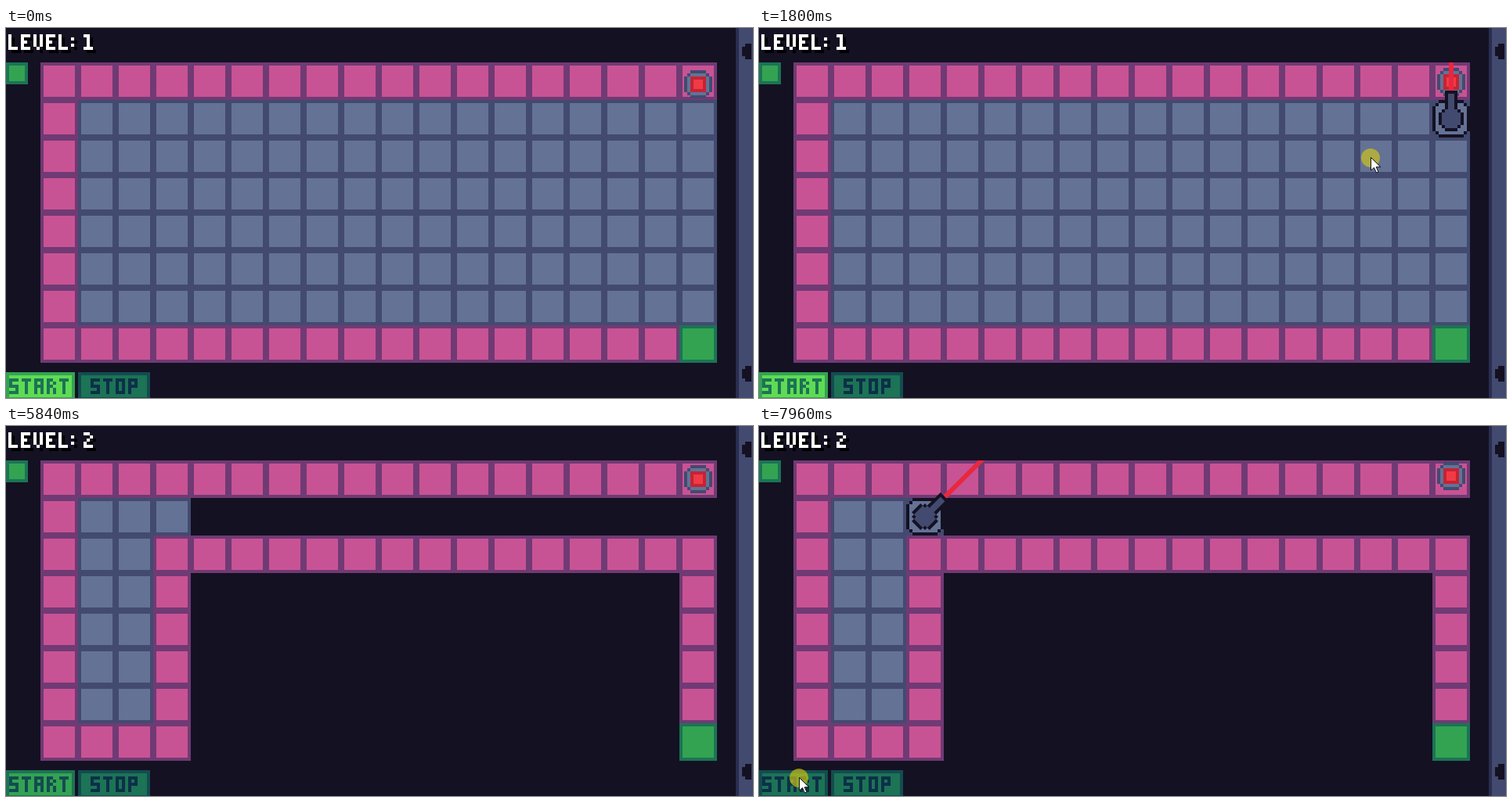
An HTML page with a canvas for the animation above (8 s loop, 954x473 px).

```html
<!DOCTYPE html>
<html lang="en">
<head>
<meta charset="utf-8">
<title>Tank puzzle</title>
<style>
html, body { margin: 0; width: 954px; height: 473px; overflow: hidden; background: #141122; }
canvas { display: block; }
</style>
</head>
<body>
<canvas id="stage" width="954" height="473" aria-label="Tank puzzle, level 1 and level 2, start and stop buttons"></canvas>
<script>
const ctx = document.getElementById('stage').getContext('2d');
const LOOP = 8000, STEP = 40, PX = 4, CELL = 48, COLS = 18, ROWS = 8, LEVEL2 = 5440;
const DARK = '#141122', STEEL = '#434a70', SLATE = '#647296';
const GREENS = ['#0c3048', '#134c50', '#1c7355', '#33a352', '#5fdb53'];
const TILES = {
  pink: ['#703a74', '#c85394'],
  slate: [STEEL, SLATE],
  green: [GREENS[2], GREENS[3]],
  red: ['#c42434', '#f23a46']
};

// Pixel letters as strokes on a 3 x 5 grid
const GLYPHS = {
  L: 'M0 0V4H2', E: 'M2 0H0V4H2M0 2H1', V: 'M0 0V3M2 0V3M1 4h.01',
  ':': 'M0 1h.01M0 3h.01', 1: 'M0 0H1V4M0 4H2',
  2: 'M0 0H1M2 1h.01M1 2h.01M0 3V4H2',
  S: 'M2 0H0V2H2V4H0', T: 'M0 0H2M1 0V4', A: 'M0 4V0H2V4M0 2H2',
  R: 'M0 4V0H1M2 1h.01M0 2H1M2 3V4', O: 'M0 0H2V4H0Z', P: 'M0 4V0H2V2H0'
};

// Pointer path: time, x, y
const PATH = [
  [160, 990, 130], [360, 910, 45], [480, 896, 30], [560, 896, 30],
  [1000, 798, 63], [1165, 880, 127], [1690, 880, 127], [2200, 51, 450],
  [2240, 51, 450], [2350, 51, 500], [2350, 990, 130], [6280, 990, 130],
  [6480, 908, 46], [6600, 898, 35], [6690, 898, 35], [7100, 212, 114],
  [7500, 212, 114], [7900, 51, 450]
];

function ease(t, from, to) {
  const u = Math.min(1, Math.max(0, (t - from) / (to - from)));
  return u * u * (3 - 2 * u);
}

function pointer(t) {
  const i = PATH.findIndex(k => k[0] > t);
  if (i === 0) return PATH[0].slice(1);
  if (i < 0) return PATH[PATH.length - 1].slice(1);
  const [t0, x0, y0] = PATH[i - 1], [t1, x1, y1] = PATH[i], s = ease(t, t0, t1);
  return [x0 + (x1 - x0) * s, y0 + (y1 - y0) * s];
}

function rect(color, x, y, w, h) {
  ctx.fillStyle = color;
  ctx.fillRect(x, y, w, h);
}

function box([edge, fill], x, y, w, h) {
  rect(edge, x, y, w, h);
  rect(fill, x + PX, y + PX, w - 2 * PX, h - 2 * PX);
}

// Centred square of n pixels with stepped corners
function block(color, x, y, n, cut) {
  const size = n * PX;
  for (let i = 0; i <= cut; i++) {
    const dx = (cut - i) * PX, dy = i * PX;
    rect(color, x - size / 2 + dx, y - size / 2 + dy, size - 2 * dx, size - 2 * dy);
  }
}

function text(str, x, y, color) {
  ctx.strokeStyle = color;
  ctx.lineWidth = 1;
  ctx.lineCap = 'square';
  for (const ch of str) {
    if (GLYPHS[ch]) {
      ctx.save();
      ctx.translate(x, y);
      ctx.scale(PX, PX);
      ctx.translate(.5, .5);
      ctx.stroke(new Path2D(GLYPHS[ch]));
      ctx.restore();
    }
    x += ch === ':' || ch === ' ' ? 8 : 16;
  }
}

function tileAt(level, c, r) {
  if (c === 17 && r === 7) return 'green';
  if (r === 0 || c === 0) return 'pink';
  if (level === 1) return r === 7 ? 'pink' : 'slate';
  if (r === 1) return c < 4 ? 'slate' : null;
  if (c < 3) return r === 7 ? 'pink' : 'slate';
  return c === 3 || r === 2 || (c === 17 && r < 7) ? 'pink' : null;
}

function drawMap(level) {
  for (let r = 0; r < ROWS; r++)
    for (let c = 0; c < COLS; c++) {
      const kind = tileAt(level, c, r);
      if (kind) box(TILES[kind], 44 + c * CELL, 44 + r * CELL, CELL, CELL);
    }
}

function drawTarget(y) {
  block(STEEL, 884, y, 9, 2);
  block(SLATE, 884, y, 7, 1);
  block(TILES.red[0], 884, y, 5, 0);
  block(TILES.red[1], 884, y, 3, 0);
}

function drawTank(x, y, angle = 0) {
  ctx.save();
  ctx.translate(x, y);
  block(DARK, 0, 0, 12, 2);
  block(SLATE, 0, 0, 10, 1);
  ctx.rotate(angle);
  block(DARK, 0, 0, 8, 2);
  rect(DARK, 0, -8, 36, 16);
  block(STEEL, 0, 0, 6, 1);
  rect(STEEL, 0, -4, 32, 8);
  ctx.restore();
}

function drawLaser(x, y, angle) {
  ctx.save();
  ctx.beginPath();
  ctx.rect(44, 44, COLS * CELL, ROWS * CELL);
  ctx.clip();
  ctx.translate(x, y);
  ctx.rotate(angle);
  rect('#e8283f', 36, -3, 1200, 6);
  ctx.restore();
}

// glow: 0 off, 1 half lit, 2 lit
function drawButton(label, x, w, textX, glow) {
  box([GREENS[glow + 1], GREENS[glow + 2]], x, 440, w, 36);
  text(label, textX, 448, GREENS[glow]);
}

function drawPanel(x, count) {
  rect(STEEL, x, 0, 120, 473);
  rect('#2a2d50', x, 0, PX, 473);
  for (const y of [20, 432]) {
    rect(DARK, x + 12, y, 8, 20);
    rect(DARK, x + 8, y + 4, 4, 12);
  }
  if (count) {
    drawTank(x + 52, 28);
    text(String(count), x + 92, 4, '#fff');
  }
}

function drawPointer(x, y) {
  ctx.fillStyle = 'rgba(212,200,20,.65)';
  ctx.beginPath();
  ctx.arc(x, y, 12, 0, 7);
  ctx.fill();
  ctx.save();
  ctx.translate(x + .5, y);
  const arrow = new Path2D('M0 0V16L4 12.5L7 19L9.5 18L6.7 11.7H12Z');
  ctx.fillStyle = '#fff';
  ctx.fill(arrow);
  ctx.strokeStyle = '#111';
  ctx.lineWidth = 1;
  ctx.stroke(arrow);
  ctx.restore();
}

const rise = (t, half, full) => t < half ? 0 : t < full ? 1 : 2;

function draw(t) {
  const level = t < LEVEL2 ? 1 : 2, first = level === 1;
  const [pick, drop, turn] = first ? [560, 1360, 1480] : [6690, 7200, 7340];
  const angle = t < turn ? 0 : first ? -Math.PI / 2 : -Math.PI / 4;
  const home = first ? [884, 116] : [212, 116];

  rect(DARK, 0, 0, 954, 473);
  text(`LEVEL: ${level}`, 7, 12, '#000');
  text(`LEVEL: ${level}`, 3, 8, '#fff');
  box(TILES.green, 0, 44, 28, 28);
  drawMap(level);

  const running = first && t >= 2280;
  if (!running) {
    const bob = first ? Math.cos((t - 60) / 125) : -Math.sin((t - LEVEL2) / 125);
    drawTarget(68 + Math.round(4 * bob));
  }
  if (t >= 4800 && t < 4840) box(TILES.red, 864, 48, 40, 40);

  if (t >= drop) {
    if (t >= turn && !running) drawLaser(...home, angle);
    drawTank(...home, angle);
  }

  const start = first ? 2 - rise(t, 2200, 2240) : rise(t, 5800, 5880) - rise(t, 7920, 7960);
  const stop = first ? rise(t, 2320, 2360) : 2 - rise(t, 5600, 5680);
  drawButton('START', 0, 88, 4, start);
  drawButton('STOP', 92, 92, 108, stop);

  const open = first
    ? ease(t, 140, 440) - ease(t, 720, 960)
    : ease(t, 6260, 6540) - ease(t, 6800, 7060);
  drawPanel(Math.round(932 - 88 * open), first ? +(t < pick) : 2);

  // A carried tank trails the pointer slightly
  if (t >= pick && t < drop) drawTank(...pointer(t - 30).map(Math.round));
  drawPointer(...pointer(t).map(Math.round));
}

function tick() {
  const t = performance.now() % LOOP;
  draw(Math.floor(t / STEP) * STEP);
  requestAnimationFrame(tick);
}
tick();
</script>
</body>
</html>
```
